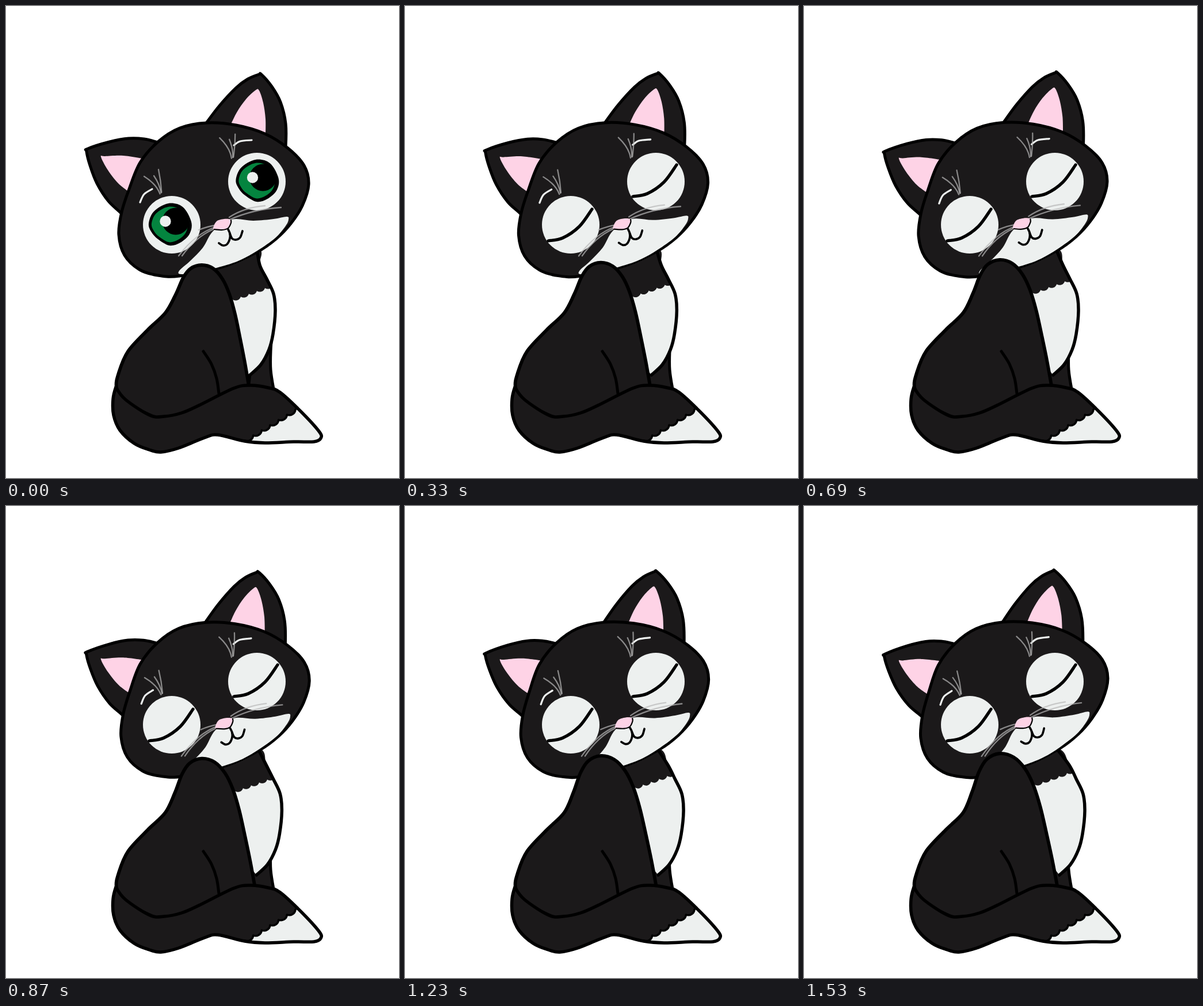
Recreate the animation shown at these times as an HTML page. Size 683 by 820 pixels, loop 2200 ms.

```html
<!DOCTYPE html>
<html lang="en">
<head>
<meta charset="utf-8">
<title>Sleepy cat</title>
<style>
html, body { margin: 0; width: 100%; height: 100%; overflow: hidden; background: #fff; }
svg { display: block; width: 100%; height: 100%; }
path { stroke-linecap: round; stroke-linejoin: round; }
</style>
</head>
<body>
<svg id="stage" viewBox="0 0 683 820"></svg>
<script>
const LOOP = 2200, STEP = 30, STEPS = 51, SHUT = 180, TILT = -2.9;
const DARK = '#1b191a', WHITE = '#edf0ef', PINK = '#fed3e6', GREEN = '#04843f', INK = '#000';
const stage = document.getElementById('stage');

function add(tag, attrs, parent = stage) {
  const el = document.createElementNS('http://www.w3.org/2000/svg', tag);
  for (const k in attrs) el.setAttribute(k, attrs[k]);
  return parent.appendChild(el);
}
const group = (parent, attrs = {}) => add('g', attrs, parent);

// "x,y" points; a trailing "!" marks a sharp corner
const parse = s => s.split(' ').map(p => {
  const [x, y] = p.replace('!', '').split(',').map(Number);
  return { x, y, sharp: p.endsWith('!') };
});

// smooth curve through the points
function curve(pts, closed) {
  const n = pts.length;
  const at = i => closed ? pts[(i + n) % n] : pts[Math.max(0, Math.min(n - 1, i))];
  const slope = i => {
    if (at(i).sharp) return [0, 0];
    const a = at(i - 1), b = at(i + 1);
    return [(b.x - a.x) / 6, (b.y - a.y) / 6];
  };
  let d = `M${pts[0].x} ${pts[0].y}`;
  for (let i = 0; i < (closed ? n : n - 1); i++) {
    const p = at(i), q = at(i + 1), u = slope(i), v = slope(i + 1);
    d += `C${p.x + u[0]} ${p.y + u[1]} ${q.x - v[0]} ${q.y - v[1]} ${q.x} ${q.y}`;
  }
  return d + (closed ? 'Z' : '');
}

const pen = (width, stroke = INK) => ({ stroke, 'stroke-width': width });
const blob = (parent, pts, fill, width = 0) =>
  add('path', { d: curve(parse(pts), true), fill, ...(width ? pen(width) : {}) }, parent);
const line = (parent, pts, width = 5, color = INK) =>
  add('path', { d: curve(parse(pts)), fill: 'none', ...pen(width, color) }, parent);
const hair = (parent, d) =>
  add('path', { d, fill: 'none', opacity: 0.7, ...pen(2.3, '#b8b8b8') }, parent);

// row of round tufts from one point to another
function tufts(x0, y0, x1, y1, n) {
  const dx = (x1 - x0) / n, dy = (y1 - y0) / n, r = Math.hypot(dx, dy) * 0.62;
  return `L${x0} ${y0}` + `a${r} ${r} 0 0 0 ${dx} ${dy}`.repeat(n);
}

// far leg, chest and neck
blob(stage, '463,560! 460,600 460,632 465,665! 420,672! 424,640!', DARK, 5);
const chestLine = '436,420 441,450 453,474 465,500 468,530 464,570 457,597 443,623 424,641';
const chestSide = parse(chestLine), chestAll = parse(chestLine + '! 360,560! 340,420!');
const chest = add('path', { fill: WHITE });
const clip = add('path', {}, add('clipPath', { id: 'chest' }));
const neck = group(group(stage, { 'clip-path': 'url(#chest)' }));
add('path', { d: 'M320 380' + tufts(394, 510, 464, 485, 5) + 'L500 380Z', fill: DARK }, neck);
const chestEdge = add('path', { fill: 'none', ...pen(5.5) });

// ears and head
const head = group();
blob(head, '336,221! 349,202 372,172 400,142 420,127 439,119 444,119 462,140 477,167 486,204 486,245 482,270!', DARK, 5);
blob(head, '388,212! 401,185 417,162 434,146 440,147 447,168 451,196 451,224!', PINK);
blob(head, '288,246! 264,237 240,231 213,230 180,236 142,248 140,253 146,277 158,308 178,339 201,361 222,386!', DARK, 5);
blob(head, '165,262 172,261 204,260 242,266! 235,300! 214,323! 195,308 177,285', PINK);
blob(head, '349,203 302,212 264,236 233,272 214,318 201,358 196,397 206,433 232,458 264,468 302,469 380,452 437,427 470,404 495,378 515,347 526,310 518,277 490,247 450,222 400,207', DARK, 5);
blob(head, '301,460 320,443 342,420 360,391 392,371 430,373 465,370 488,366 491,371 486,382 468,403 437,425 408,441 380,451 340,461 305,466', WHITE);

// eyes stay in place while the head tilts
const eyes = group(), open = group(), shut = group();
for (const [dx, dy] of [[0, 0], [148, -75]])
  add('circle', { cx: 288 + dx, cy: 380 + dy, r: 50, fill: WHITE }, eyes);
for (const [dx, dy] of [[0, 0], [151.5, -76]]) {
  const g = group(open, { transform: `translate(${dx} ${dy})` });
  const iris = '248,378 257,357 282,343 307,349 322,375 319,396 303,411 284,416 264,405 253,393';
  blob(g, iris, INK);
  blob(group(g, { transform: 'translate(284 380) scale(.84) translate(-285 -380)' }), iris, GREEN);
  add('circle', { cx: 295, cy: 374, r: 23.5, fill: INK }, g);
  add('circle', { cx: 277, cy: 374, r: 9.7, fill: WHITE }, g);
}
for (const [dx, dy] of [[0, 0], [147, -77]])
  line(group(shut, { transform: `translate(${dx} ${dy})` }), '249,408 274,403 303,383 325,353', 5.3);

// brows, hairs and whiskers
const face = group();
line(face, '233,341 240,327 254,318', 3.2, WHITE);
line(face, '396,242 407,235 427,233', 3.2, WHITE);
for (const [x, y, turn] of [[271, 323, 0], [396, 262, 12]]) {
  const fan = group(face, { transform: `translate(${x} ${y}) rotate(${turn})` });
  for (const [tx, ty] of [[-31, -27], [-14, -28], [-6, -39]])
    hair(fan, `M${tx / 9} ${-tx / 9}Q${tx * 0.3} ${ty * 0.5} ${tx} ${ty}`);
}
hair(face, 'M389 371Q430 353 478 350');
hair(face, 'M388 367Q414 350 450 347');
hair(face, 'M364 381Q350 383 335 389');
hair(face, 'M364 384Q330 395 300 434');
hair(face, 'M360 388Q329 402 306 434');

// nose and mouth
blob(face, '360,386 366,374 379,370 390,371 391,377 386,386 376,389 364,388', PINK);
line(face, '362,388 376,389 386,386 391,377 391,372', 2.2);
line(face, '386,388 389,395 389,404 384,414 377,416 370,412', 3.7);
line(face, '389,395 393,404 400,406 407,402 411,391', 3.7);

// back, shoulder and near leg
const torsoPts = parse('192,663 196,637 212,600 246,563 277,533 295,501 308,472 321,456 340,450 360,456 376,474 388,500 398,535 407,578 415,619 422,660! 370,700! 270,720! 205,690!');
const torso = add('path', { fill: DARK, ...pen(5.8) });
line(stage, '343,600 357,622 366,647 370,673');

// tail
const tail = '191,662! 186,683 187,711 198,737 223,760 249,771 269,775 300,768 345,750 368,745 415,756 450,759 500,757 535,757 547,751 544,739 511,703 476,671 455,663 425,659 396,664 335,694 305,707 275,713 250,711 208,684';
const fringe = tufts(415, 755, 503, 701, 6).replace('L', 'M');
blob(stage, tail, DARK);
add('path', { d: fringe + 'L511 703L543 738Q553 755 535 757L500 757L450 759Z', fill: WHITE });
add('path', { d: fringe, fill: 'none', ...pen(3.5) });
blob(stage, tail, 'none', 5.5);

const ramp = (v, from, to) => {
  const u = Math.max(0, Math.min(1, (v - from) / (to - from)));
  return u * u * (3 - 2 * u);
};

// the shoulder rises and the near leg moves forward
const lift = k => p => {
  const f = k * ramp(p.x, 270, 340);
  return { ...p, x: p.x + 0.22 * f * (p.x - 340), y: p.y - 20 * f * (660 - p.y) / 210 };
};
const swell = k => p => ({ ...p, x: p.x + 20 * k * ramp(p.y, 412, 452) });

function draw(t) {
  const k = Math.min(STEPS, Math.floor(t / STEP)) / STEPS;
  for (const g of [head, face]) g.setAttribute('transform', `rotate(${TILT * k} 320 265)`);
  neck.setAttribute('transform', `translate(${7 * k} ${-26 * k})`);
  torso.setAttribute('d', curve(torsoPts.map(lift(k)), true));
  chestEdge.setAttribute('d', curve(chestSide.map(swell(k))));
  for (const el of [chest, clip]) el.setAttribute('d', curve(chestAll.map(swell(k)), true));
  open.style.display = t < SHUT ? '' : 'none';
  shut.style.display = t < SHUT ? 'none' : '';
}

const start = performance.now();
function tick() {
  draw((performance.now() - start) % LOOP);
  requestAnimationFrame(tick);
}
draw(0);
requestAnimationFrame(tick);
</script>
</body>
</html>
```
